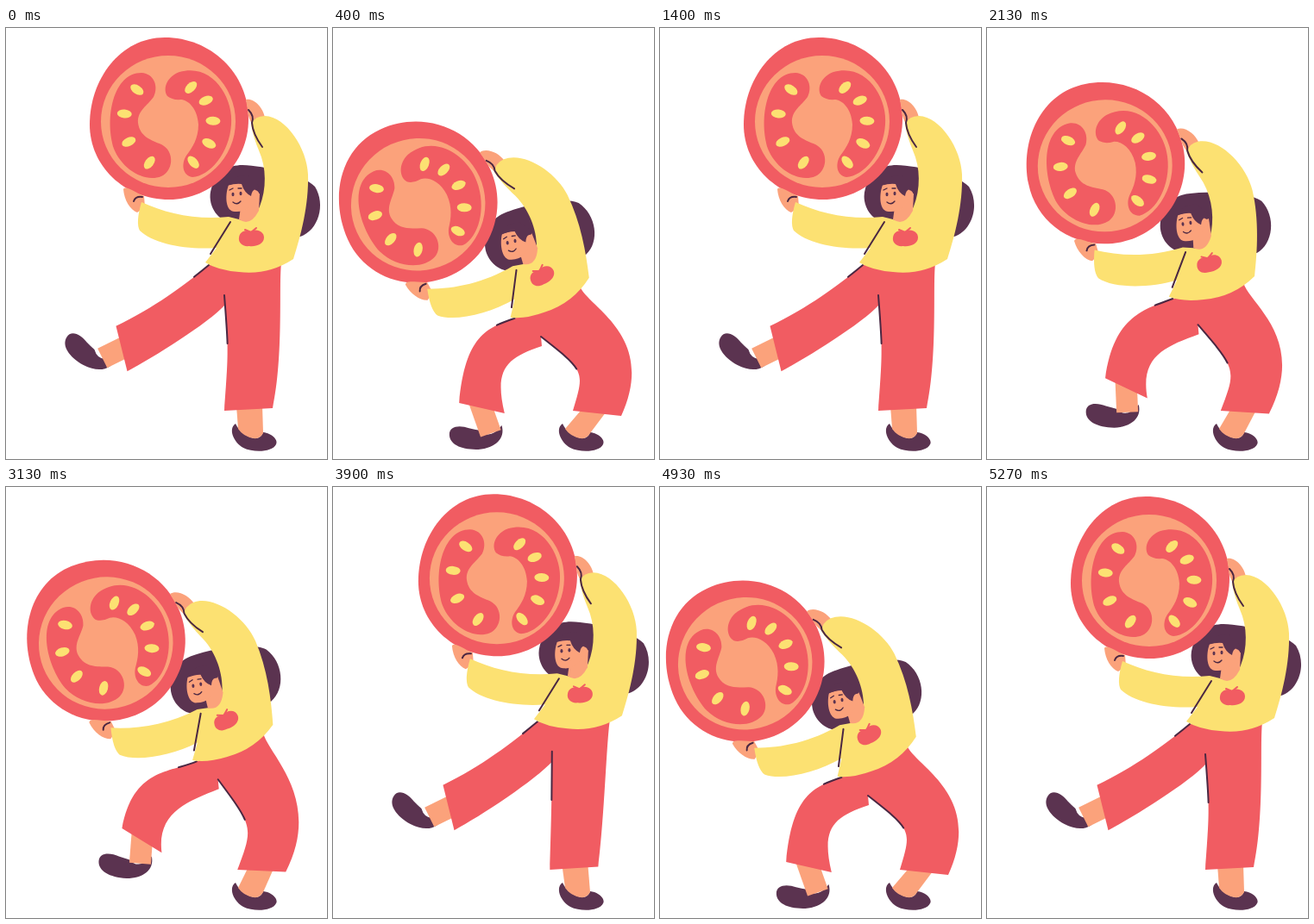
Recreate the animation shown at these times as an HTML page. Size 372 by 500 pixels, loop 5730 ms.

```html
<!DOCTYPE html>
<html>
<head>
<meta charset="utf-8">
<style>
  html, body { margin: 0; height: 100%; overflow: hidden; background: #fff; }
  svg { display: block; width: 372px; height: 500px; }
  .red { fill: #f15c62; }
  .peach { fill: #fba27b; }
  .yellow { fill: #fce172; }
  .dark { fill: #5b3350; }
  .line, .thin, .stem { fill: none; stroke: #4a2742; stroke-width: 2; stroke-linecap: round; }
  .thin { stroke-width: 1.3; }
  .stem { stroke: #f15c62; }
</style>
</head>
<body>
<svg viewBox="0 0 372 500">
  <path id="shoeL" class="dark" d="M-31,-4C-31,-15 -18,-15 -8,-11Q-1,-9 4,-8Q16,4 30,-13C34,2 22,13 2,14C-18,14 -31,7 -31,-4Z"/>
  <path id="ankleL" fill="none" stroke="#fba27b" stroke-width="25"/>
  <path class="dark" d="M266,459C270,468 280,476 290,476Q296,475 298,469C308,470 316,478 313,483C309,492 287,493 275,487C264,481 257,465 266,459Z"/>
  <path id="ankleR" class="peach"/>
  <path id="trousers" class="red"/>
  <path id="crease" class="line" stroke-dasharray="22 999"/>
  <path id="fold" class="line" stroke-dasharray="56 999"/>
  <g id="upper">
    <path class="dark" d="M262,224C246,226 232,205 238,186C244,167 258,159 274,159C300,160 345,170 358,184C371,205 362,235 341,242Z"/>
    <path class="red" d="M184,11C237,11 281,52 281,106C281,157 239,199 189,199C137,199 97,160 97,112C97,60 132,11 184,11Z"/>
    <ellipse class="peach" cx="188" cy="108.5" rx="78" ry="76.5"/>
    <path class="red" d="M157,52C172,53 177,68 171,80C164,90 152,96 153,110C155,126 168,130 180,135C196,143 194,166 180,172C160,180 134,163 125,140C114,105 124,52 157,52Z"/>
    <path class="red" d="M187,79C181,70 187,56 201,51C240,40 264,82 261,112C259,145 236,172 216,173C204,171 203,157 209,148C216,139 223,128 223,112C222,94 212,84 203,83Q193,84 187,79Z"/>
    <g id="seeds" class="yellow"></g>
    <path class="peach" d="M278,83C287,81 298,92 300,104L287,114C283,109 280,101 280,95Z"/>
    <path class="peach" d="M136,187C139,182 148,190 160,195L161,208L152,214C144,211 137,200 136,187Z"/>
    <path class="line" d="M158,196Q150,195 148,201"/>
    <path class="yellow" d="M300,102C325,103 349,140 350,170C351,205 342,240 333,268Q304,287 270,283Q245,281 231,272L244,255C210,258 170,250 155,235Q150,226 157,202C185,215 220,223 258,219L270,222Q285,228 294,207C302,187 302,162 293,142Q287,128 284,112Q288,102 300,102Z"/>
    <path class="line" d="M260,225L237,262M281,95Q288,102 285,110Q286,123 297,138"/>
    <path class="peach" d="M272,208L270,222Q283,231 293,212L294,192L280,195Z"/>
    <g id="face">
      <path class="peach" d="M258,182C253,196 255,213 265,213C277,214 284,208 287,199C294,199 296,190 289,188L278,178Z"/>
      <path class="dark" d="M256,183Q263,170 280,171L292,182Q294,188 289,187Q285,188 284,195Q276,191 273,181Q266,180 256,183Z"/>
      <path class="thin" d="M259,188L263,186M269,186L273,186M263,202Q268,206 272,201"/>
      <ellipse class="dark" cx="263" cy="193" rx="1.5" ry="2.2"/>
      <ellipse class="dark" cx="272" cy="192" rx="1.5" ry="2.2"/>
    </g>
    <path class="red" d="M283,236C291,232 299,236 299,243C299,251 289,254 282,253C274,254 269,249 270,243C271,236 277,234 283,236Z"/>
    <path class="stem" d="M277,234L284,237L290,232"/>
  </g>
</svg>
<script>
const el = id => document.getElementById(id);
const LOOP = 5730;
// First moving moment and return to rest of each of the three squats.
const SQUATS = [[70, 1400], [1970, 3330], [3900, 5270]];

const ramp = (t, start, length) => Math.min(1, Math.max(0, (t - start) / length));
const easeOut = k => 1 - (1 - k) ** 2;
const smooth = k => k * k * (3 - 2 * k);
const mix = (a, b, k) => a.map((v, i) => v + (b[i] - v) * k);
const add = (p, q) => [p[0] + q[0], p[1] + q[1]];
const turn = (x, y, deg) => {
  const r = deg * Math.PI / 180, c = Math.cos(r), s = Math.sin(r);
  return [x * c - y * s, x * s + y * c];
};

// crouch: 0 standing, 1 squatting; lift: 1 foot kicked out, 0 on the floor.
function poseAt(time) {
  const [start, end] = SQUATS.find(s => time < s[1]) || SQUATS[0];
  const t = time < end ? time : 0;
  const down = easeOut(ramp(t, start + 38, 265));
  const up = smooth(ramp(t, end - 310, 260));
  const lean = smooth(ramp(t, start + 50, 235)) - smooth(ramp(t, end - 250, 240));
  const stretch = 0.08 * Math.sin(Math.PI * ramp(t, start - 25, 85));
  return { crouch: down - up - stretch, lift: 1 - down + up, tilt: -24.5 * lean };
}

function draw({ crouch, lift, tilt }) {
  const set = (id, d) => el(id).setAttribute('d', d);
  const move = (id, transform) => el(id).setAttribute('transform', transform);
  const waist = mix([285, 275], [256, 316], crouch);
  const fromWaist = (x, y) => add(waist, turn(x, y, tilt));
  const hipL = fromWaist(-50, 0), hipR = fromWaist(34, -2);
  const crotch = mix([253, 310], [241, 358], crouch);
  const seat = add(crotch, [1, 11]);

  // Left leg: the foot swings along one arc and takes the hem with it.
  const kick = lift * lift;
  const foot = [166 - 71 * lift, 475 - 85 * lift - 12 * kick];
  const footAngle = 32 * kick - 2;
  const hem = add(foot, [6.5 + 32.5 * lift, -34 + 28 * kick]);
  const half = turn(27, 0, 13 + 63 * lift ** 1.3);
  const hemOut = add(hem, [-half[0], -half[1]]), hemIn = add(hem, half);
  const outer = `M${hipL}C${add(hipL, mix([-32, 11], [-30, 25], kick))} ` +
    `${add(hemOut, mix([7, -78], [45, -22], kick))} ${hemOut}`;
  const inner = `L${hemIn}C${add(hemIn, mix([-12, -51], [30, -16], kick))} ` +
    `${add(seat, mix([-42, 14], [-20, 22], kick))} ${seat}`;

  // Right leg: the foot stays, the knee pushes outwards.
  const bend = crouch * (2 - crouch);
  const knee = mix([322, 380], [376, 358], bend);
  const kneePit = mix([258, 375], [292, 398], bend);
  const cuff = mix([309, 441], [334, 450], crouch);
  const fold = `${crotch}C${kneePit} ${kneePit} ${cuff[0] - 56},444`;
  set('trousers', `${outer}${inner}L${fold}L${cuff}` +
    `C${knee} ${add(hipR, [14 * crouch - 3, 25])} ${hipR}Z`);
  set('crease', outer);
  set('fold', `M${fold}`);

  const heel = add(foot, turn(17, -4, footAngle));
  set('ankleL', `M${mix(hem, heel, -0.5)}L${heel}`);
  set('ankleR', `M${cuff[0] - 42},438h30L298,470Q294,477 287,476Q275,474 269,465Z`);
  move('shoeL', `translate(${foot}) rotate(${footAngle})`);
  move('upper', `translate(${waist}) rotate(${tilt}) translate(-285 -275)`);
  move('face', `rotate(${-0.7 * tilt} 267 195)`);
}

// Seeds fan out along an arc around the middle of the slice.
function seedArc(count, from, step, radius, growth) {
  return Array.from({ length: count }, (_, i) => {
    const angle = from + step * i, [x, y] = turn(radius + growth * i, 0, angle);
    const tilt = 0.8 * (angle > 90 ? angle - 180 : angle);
    return `<ellipse rx="8.5" ry="5" transform="translate(${189 + x} ${105 + y}) rotate(${tilt})"/>`;
  }).join('');
}
el('seeds').innerHTML = seedArc(4, 222, -36, 50, 2) + seedArc(5, -55, 29, 44, 3.5);

const begin = performance.now();
function frame() {
  draw(poseAt((performance.now() - begin) % LOOP));
  requestAnimationFrame(frame);
}
frame();
</script>
</body>
</html>
```
